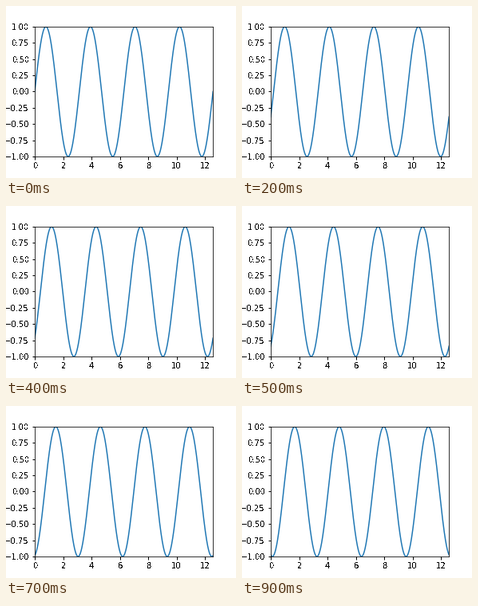
A matplotlib script that plays this animation: 288x216 px, repeating every 1 s.

```python
import matplotlib.pyplot as plt
import numpy as np
from matplotlib.animation import FuncAnimation

FRAMES = 10
INTERVAL = 100
SHIFT = 0.1

plt.rcParams.update({"font.family": "DejaVu Sans", "font.size": 10})


def harden(image, dpi):
    """Turn soft glyph edges into solid pixels."""
    image = image.copy()
    image[..., 3] = image[..., 3] > 0.5
    return image, 0, 0


fig, ax = plt.subplots(figsize=(4, 3), dpi=72)
fig.subplots_adjust(left=0.125, right=0.9, bottom=0.125, top=0.88)

x = np.linspace(0, 4 * np.pi, 1000)
line, = ax.plot(x, np.sin(2 * x), color="#1f77b4", lw=1.5)
ax.set_xlim(0, 4 * np.pi)
ax.set_ylim(-1, 1)
ax.set_xticks(range(0, 13, 2))
ax.set_yticks(np.linspace(-1, 1, 9))
ax.tick_params(width=1)
for label in ax.get_xticklabels() + ax.get_yticklabels():
    label.set_agg_filter(harden)


def update(i):
    line.set_ydata(np.sin(2 * (x - SHIFT * i)))
    return line,


anim = FuncAnimation(fig, update, frames=FRAMES, interval=INTERVAL,
                     repeat=True, repeat_delay=0)
plt.show()
```
